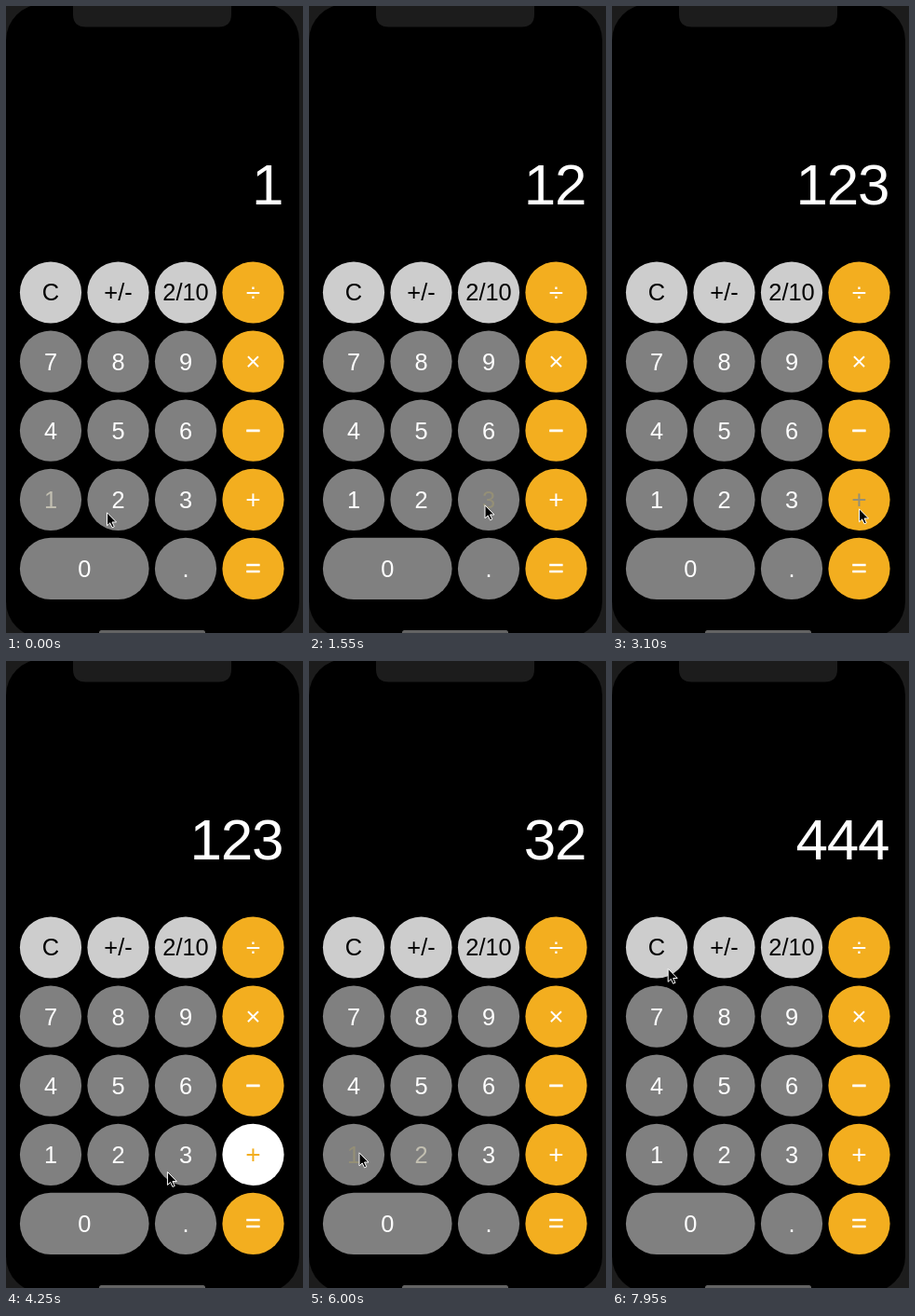
An HTML page that plays this animation: 319x673 px, repeating every 8 s.

```html
<!DOCTYPE html>
<html lang="en">
<head>
<meta charset="utf-8">
<title>Calculator</title>
<style>
  html, body { margin: 0; width: 100%; height: 100%; overflow: hidden; background: #1c1c1c; }
  svg { display: block; width: 100%; height: 100%; }
  text { font-family: "Liberation Sans", Arial, sans-serif; text-anchor: middle; }
  #display { text-anchor: end; letter-spacing: -1.2px; }
</style>
</head>
<body>
<svg viewBox="0 0 319 673">
  <rect width="319" height="673" fill="#1c1c1c"/>
  <rect y="-2" width="315" height="680" rx="39" fill="#000"/>
  <path d="M72 0H242V9Q242 22.5 228 22.5H86Q72 22.5 72 9Z" fill="#1c1c1c"/>
  <rect x="100" y="670" width="114" height="5" rx="2.5" fill="#636363"/>
  <text id="display" x="297.3" y="212.6" font-size="62" fill="#fff"></text>
  <g id="keys"></g>
  <path id="cursor" d="M0 0V14L3.2 11.1L5.5 16L7.8 15L5.5 10.2H10Z"
        fill="#000" stroke="#fff" stroke-linejoin="round"/>
</svg>
<script>
const LOOP = 8000, STEP = 50, GLIDE = 500, HOLD = 150, FADE = 350;
const GREY = "#808080", LIGHT = "#cdcdcd", ORANGE = "#f3ae1f", WHITE = "#ffffff";
const DIMMED = [148, 143, 118];
const RADIUS = 33.1, COLUMN = 72.5, ROW = 74.1;

const rows = ["C +/- 2/10 ÷", "7 8 9 ×", "4 5 6 −", "1 2 3 +", "0 . ="];
const byId = id => document.getElementById(id);
const display = byId("display"), cursor = byId("cursor");

function add(parent, tag, attrs) {
  const el = document.createElementNS("http://www.w3.org/2000/svg", tag);
  for (const name in attrs) el.setAttribute(name, attrs[name]);
  return parent.appendChild(el);
}

function makeKey(label, row, col, span, isOp) {
  const stretch = (span - 1) * COLUMN;
  const x = 48 + col * COLUMN + stretch / 2;
  const y = 307.5 + row * ROW;
  const width = 2 * RADIUS + stretch;
  const ink = isOp || row ? WHITE : "#000";
  const face = add(byId("keys"), "rect", {
    x: x - width / 2, y: y - RADIUS, width, height: 2 * RADIUS, rx: RADIUS,
    fill: isOp ? ORANGE : row ? GREY : LIGHT
  });
  const text = add(byId("keys"), "text", {
    x, y: y + (isOp ? 9.4 : 8.9), "font-size": isOp ? 28 : 25.4, fill: ink
  });
  if (label === "−" || label === "=") {
    text.setAttribute("stroke", ink);
    text.setAttribute("stroke-width", 0.7);
  }
  text.textContent = label;
  return { face, text, x, y };
}

const keys = {};
rows.forEach((line, row) => {
  let col = 0;
  line.split(" ").forEach(label => {
    const span = label === "0" ? 2 : 1;
    keys[label] = makeKey(label, row, col, span, col === 3);
    col += span;
  });
});

// The pointer reaches each stop at time `at`, offset from the key's centre.
const stops = [];
function rest(key, at, dx, dy, hold = 0) {
  const last = stops[stops.length - 1];
  const start = last ? Math.max(last.end, at - GLIDE) : at;
  stops.push({ key, at, start, end: at + hold, hold,
               x: keys[key].x + dx, y: keys[key].y + dy });
}
const press = (key, at, dx, dy, hold = HOLD) => rest(key, at, dx, dy, hold);

press("1", -300, 0, 0);
rest("2", 0, -12, 14);
press("2", 900, 2, 9);
press("3", 1450, -4, 6);
press("+", 3050, 0, 10, 800);
rest("1", 4620, 14, 29);
press("3", 5300, -14, 0);
press("2", 5700, 1, 2);
press("1", 6000, 6, -2);
press("=", 7050, 12, 6);
rest("C", 8000, 10, 20);

const presses = stops.filter(s => s.hold);

function calculate(t) {
  let shown = "", sum = 0, armed = false;
  for (const { key, end } of presses) {
    if (end > t) break;
    if (key === "+") {
      sum = Number(shown);
      armed = true;
    } else if (key === "=") {
      shown = String(sum + Number(shown));
    } else {
      shown = armed ? key : shown + key;
      armed = false;
    }
  }
  return { shown, armed };
}

function inkAt(key, t) {
  const last = presses.filter(p => p.key === key && p.at <= t).pop();
  const dim = last ? Math.min(1, Math.max(0, 1 - (t - last.end) / FADE)) : 0;
  return `rgb(${DIMMED.map(v => Math.round(255 + (v - 255) * dim))})`;
}

function pointerAt(t) {
  const i = stops.filter(s => s.start <= t).length - 1;
  const from = stops[Math.max(0, i - 1)], to = stops[i];
  const left = Math.max(0, (to.at - t) / (to.at - to.start || 1));
  const k = 1 - left * left;
  return [from.x + (to.x - from.x) * k, from.y + (to.y - from.y) * k];
}

function draw(time) {
  const t = Math.floor((time % LOOP) / STEP) * STEP;
  const { shown, armed } = calculate(t);
  display.textContent = shown;
  for (const { key } of presses) keys[key].text.setAttribute("fill", inkAt(key, t));
  keys["+"].face.setAttribute("fill", armed ? WHITE : ORANGE);
  if (armed) keys["+"].text.setAttribute("fill", ORANGE);
  cursor.setAttribute("transform", `translate(${pointerAt(t)})`);
}

const begin = performance.now();
function tick() {
  draw(Math.max(0, performance.now() - begin));
  requestAnimationFrame(tick);
}
tick();
</script>
</body>
</html>
```
